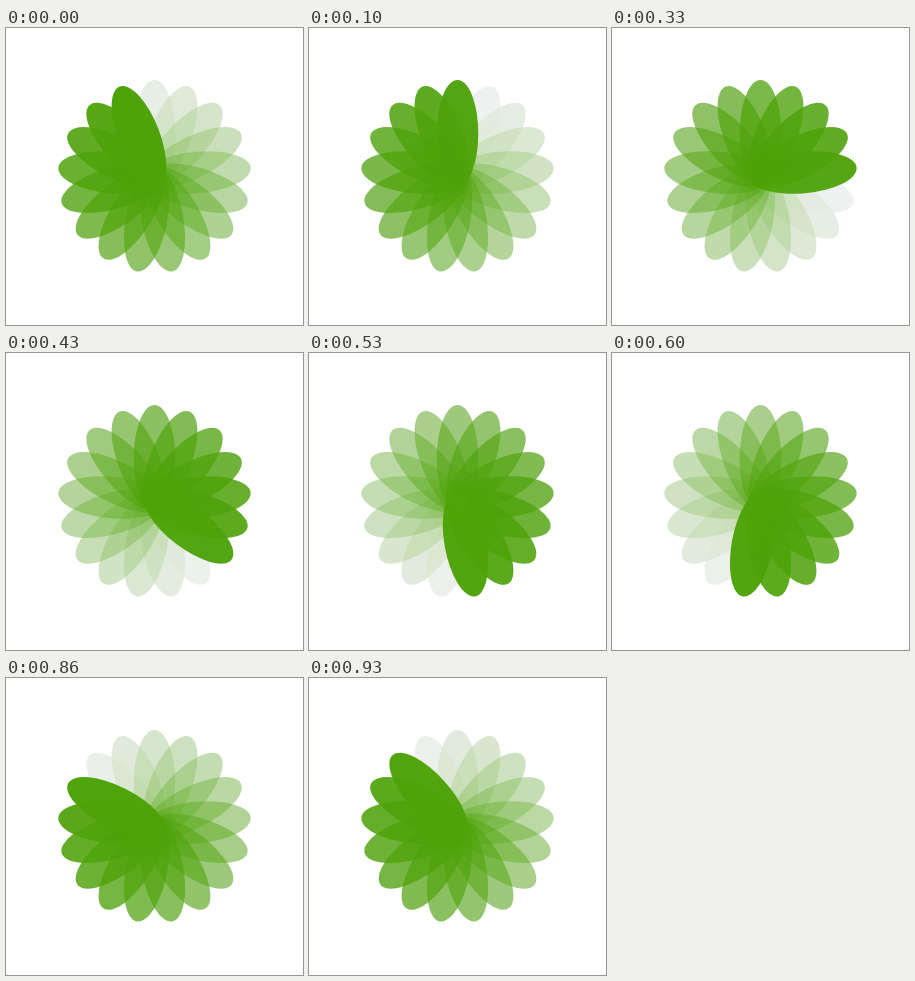
These frames come from a looping animation (297x297 px, 0.96 s). An HTML page:

```html
<!DOCTYPE html>
<html lang="en">
<head>
<meta charset="utf-8">
<title>Petal spinner</title>
<style>
  html, body { margin: 0; width: 100%; height: 100%; overflow: hidden; background: #fff; }
  svg { display: block; width: 100vw; height: 100vh; }
</style>
</head>
<body>
<svg id="stage" viewBox="0 0 100 100">
  <g id="base" fill="#f1f2f3"></g>
  <g id="petals" fill="#4ea309"></g>
</svg>
<script>
const LOOP = 960, STEPS = 29, COUNT = 17;
const TURN = STEPS * COUNT;

function addPetal(parent, i) {
  const el = document.createElementNS("http://www.w3.org/2000/svg", "ellipse");
  const attrs = { cx: 50, cy: 35.5, rx: 7, ry: 18, transform: `rotate(${i * 360 / COUNT} 50 50)` };
  for (const name in attrs) el.setAttribute(name, attrs[name]);
  parent.appendChild(el);
  return el;
}

const base = document.getElementById("base");
const group = document.getElementById("petals");
const petals = [];
for (let i = 0; i < COUNT; i++) {
  addPetal(base, i);
  petals.push(addPetal(group, i));
}

// 30 steps per second, each start rounded down to 10 ms
function stepAt(ms) {
  const tick = Math.floor(ms / 10);
  return Math.ceil(3 * (tick + 1) / 10) - 1;
}

// Each petal flashes to full in turn, then fades evenly over one loop
function draw(ms) {
  const step = stepAt(ms % LOOP);
  petals.forEach((el, i) => {
    const age = (step * COUNT - (i + 1) * STEPS + TURN) % TURN;
    el.setAttribute("opacity", 1 - age / TURN);
  });
}

const start = performance.now();
function tick() {
  draw(performance.now() - start);
  requestAnimationFrame(tick);
}
tick();
</script>
</body>
</html>
```
